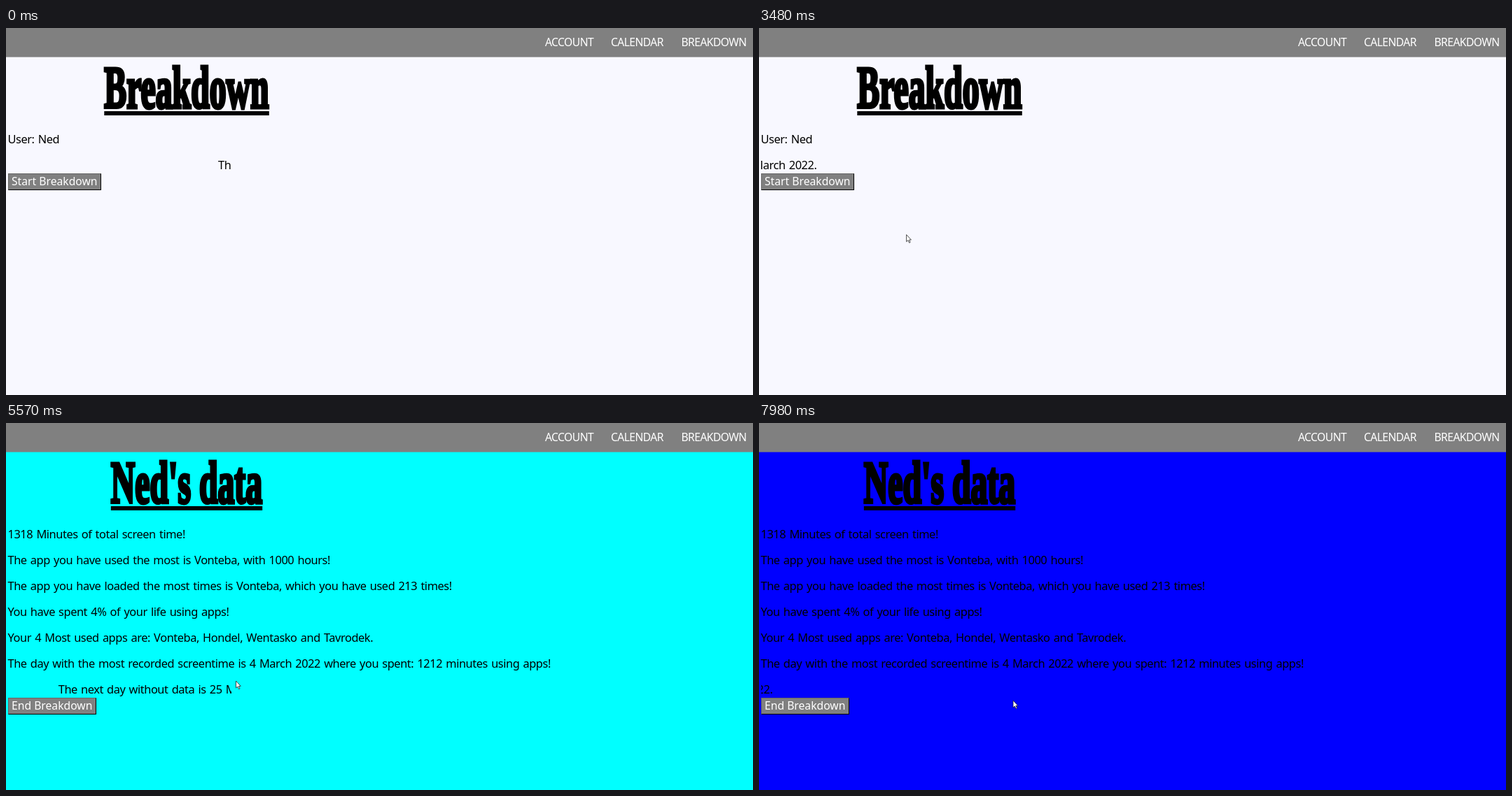
These frames come from a looping animation (1067x525 px, 8 s). An HTML page:

```html
<!DOCTYPE html>
<html lang="en">
<head>
<meta charset="utf-8">
<title>Breakdown</title>
<style>
  html, body { margin: 0; width: 100%; height: 100%; overflow: hidden; }
  body { position: relative; background: #f8f8ff; color: #000; font: 16.4px "Noto Sans", sans-serif; }
  nav {
    position: absolute; left: 0; top: 0; width: 100%; height: 42px;
    background: linear-gradient(#808080 41.2px, transparent 42px);
  }
  nav span {
    position: absolute; top: 0; line-height: 41px; color: #fff;
    font-size: 15.7px; font-weight: 500; letter-spacing: -.6px;
  }
  h1 {
    position: absolute; left: 258px; top: 53.2px; margin: 0; padding-bottom: 1px; white-space: pre;
    font: bold 85px/65px "Liberation Serif", serif;
    -webkit-text-stroke: 5px #000; border-bottom: 6.5px solid #000;
    transform: translateX(-50%) scaleX(.562);
  }
  main { position: absolute; left: 2.5px; top: 140px; }
  p {
    margin: 0; height: 37px; line-height: 37px; white-space: pre;
    letter-spacing: -.45px; word-spacing: 1.37px;
  }
  #ticker { position: relative; width: 319.5px; overflow: hidden; }
  #ticker span { position: absolute; left: 0; top: 0; }
  #button {
    box-sizing: border-box; width: max-content; height: 23.5px; margin-top: -6px; padding: 0 4.5px;
    background: #808080; color: #fff; font-size: 15.7px; font-weight: 500; line-height: 21.5px; white-space: pre;
    border: solid; border-width: 1px 1.5px 1.5px 1px; border-color: #666 #000 #000 #666;
  }
  #cursor { position: absolute; left: 0; top: 0; overflow: visible; }
</style>
</head>
<body>
<nav>
  <span style="left:770px">ACCOUNT</span>
  <span style="left:864px">CALENDAR</span>
  <span style="left:964.5px">BREAKDOWN</span>
</nav>
<h1 id="title"></h1>
<main>
  <div id="lines"></div>
  <p id="ticker"><span id="message">The next day without data is 25 March 2022.</span></p>
  <div id="button"></div>
</main>
<svg id="cursor" width="8" height="13">
  <path id="arrow" d="M0 0V10L2.3 8L4 11.6L5.5 10.9L3.9 7.4H6.8Z" fill="#fff" stroke="#222" stroke-width=".8"/>
  <path id="beam" d="M-2 -5.5H2M0 -5.5V5.5M-2 5.5H2" fill="none" stroke="#333" stroke-width=".9"/>
</svg>
<script>
const $ = id => document.getElementById(id);
const LOOP = 8000, TICK = 69.5;
const OPEN = 4390, BLUE = 5710, BEAM_END = 5100;
const SPEED = .1585, PERIOD = 4120, LEAD = 120;

const intro = { title: "Breakdown", button: "Start Breakdown", lines: ["User: Ned"] };
const report = {
  title: "Ned's data",
  button: "End Breakdown",
  lines: [
    "1318 Minutes of total screen time!",
    "The app you have used the most is Vonteba, with 1000 hours!",
    "The app you have loaded the most times is Vonteba, which you have used 213 times!",
    "You have spent 4% of your life using apps!",
    "Your 4 Most used apps are: Vonteba, Hondel, Wentasko and Tavrodek.",
    "The day with the most recorded screentime is 4 March 2022 where you spent: 1212 minutes using apps!"
  ]
};

// Pointer path: time, x, y
const path = [
  [2900, 1045, 512], [3340, 427, 358], [3470, 213, 297], [3760, 74, 219],
  [4300, 74, 219], [4580, 77, 223], [4900, 77, 223], [5560, 328.5, 369], [5780, 363, 397]
];

function pointAt(t) {
  const i = path.findIndex(k => k[0] > t);
  if (i < 0) return path[path.length - 1].slice(1);
  const [a, b] = [path[i - 1], path[i]];
  const k = (t - a[0]) / (b[0] - a[0]);
  return [a[1] + (b[1] - a[1]) * k, a[2] + (b[2] - a[2]) * k];
}

let shown;
function showPage(page) {
  if (page === shown) return;
  shown = page;
  $("title").textContent = page.title;
  $("button").textContent = page.button;
  $("lines").replaceChildren(...page.lines.map(text => {
    const p = document.createElement("p");
    p.textContent = text;
    return p;
  }));
}

function draw(now) {
  const t = Math.floor((now % LOOP) / TICK + .2) * TICK;
  const open = t >= OPEN;
  showPage(open ? report : intro);
  document.body.style.background = t >= BLUE ? "#00f" : open ? "#0ff" : "#f8f8ff";

  const x = 319.5 - SPEED * ((t + LEAD) % PERIOD);
  $("message").style.transform = `translateX(${x}px)`;

  const visible = t >= path[0][0];
  const beam = open && t < BEAM_END;
  $("cursor").style.display = visible ? "" : "none";
  $("arrow").style.display = beam ? "none" : "";
  $("beam").style.display = beam ? "" : "none";
  if (visible) {
    const [cx, cy] = pointAt(t);
    $("cursor").style.transform = `translate(${cx}px, ${cy}px)`;
  }
}

const start = performance.now();
function frame() {
  draw(performance.now() - start);
  requestAnimationFrame(frame);
}
frame();
</script>
</body>
</html>
```
